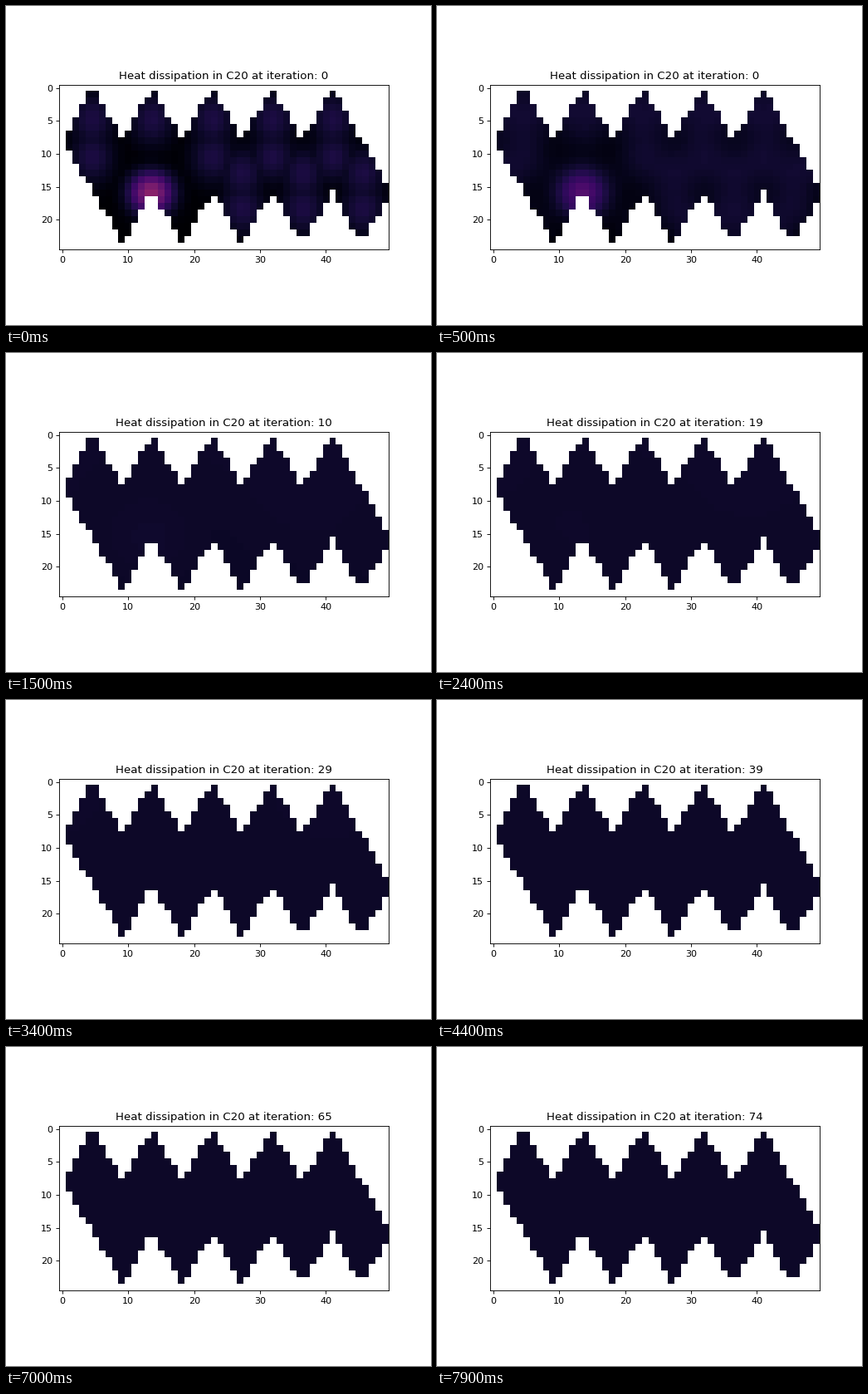
Animation, 512 px wide and 384 px high, one loop 8 s. Source, as a matplotlib script:

```python
import numpy as np
import matplotlib.pyplot as plt
from matplotlib.animation import FuncAnimation

ROWS, COLS = 25, 50
HOLD, FRAMES = 5, 80
SUBSTEPS = 7
PEAKS, PITCH = 5, 9

y, x = np.mgrid[:ROWS, :COLS]


def net_mask():
    """Unfolded net: five sloping teeth above and five below."""
    k = np.arange(PEAKS)[:, None]
    d = np.arange(COLS) - PITCH * k
    left = 7.15 + 0.17 * k - 1.75 * (d - 1)
    right = 8.68 - 0.12 * k + 1.75 * (d - 9)
    down = 23.25 - 0.12 * k + 1.7 * (d - 9)
    up = 22.02 + 0.13 * k - 1.7 * (d - 10)
    top = np.floor(np.maximum(left, right).min(axis=0))
    bottom = np.floor(np.minimum(down, up).max(axis=0))
    return (y >= top) & (y <= bottom)


mask = net_mask()


def blob(cx, cy, peak, sx, sy):
    return peak * np.exp(-((x - cx) / sx) ** 2 / 2 - ((y - cy) / sy) ** 2 / 2)


def start():
    """Warm faces in a zigzag, a cold patch and one hot spot inside it."""
    heat = blob(13.5, 16, 0.38, 2.3, 2.2)
    for j in range(2 * PEAKS):
        if j in (1, 3):
            continue
        for cy in (13, 18.3) if j % 2 else (4.8, 10.5):
            if (j, cy) != (2, 10.5):
                heat = np.maximum(heat, blob(4.5 + 4.57 * j, cy, 0.115, 2.5, 3))
    return np.where(mask, heat, 0)


def spread(heat):
    """One diffusion step; rows close across the gaps of the net."""
    change = np.zeros_like(heat)
    flow = np.diff(heat, axis=0) * (mask[1:] & mask[:-1])
    change[:-1] += flow
    change[1:] -= flow
    for r in range(ROWS):
        line = heat[r, mask[r]]
        change[r, mask[r]] += np.roll(line, 1) + np.roll(line, -1) - 2 * line
    return heat + 0.22 * change


states = [start()]
for _ in range(FRAMES - HOLD):
    heat = states[-1]
    for _ in range(SUBSTEPS):
        heat = spread(heat)
    states.append(heat)

plt.rcParams["text.kerning_factor"] = 6
fig, ax = plt.subplots(figsize=(6.4, 4.8), dpi=80)
cmap = plt.get_cmap("inferno").copy()
cmap.set_bad("white")
image = ax.imshow(np.ma.array(states[0], mask=~mask), cmap=cmap, vmin=0, vmax=1,
                  interpolation="nearest")
title = ax.set_title("")


def draw(i):
    image.set_data(np.ma.array(states[max(0, i - HOLD + 1)], mask=~mask))
    title.set_text(f"Heat dissipation in C20 at iteration: {max(0, i - HOLD)}")
    return image, title


anim = FuncAnimation(fig, draw, frames=FRAMES, interval=100, repeat=True,
                     repeat_delay=0, blit=False)
plt.show()
```
